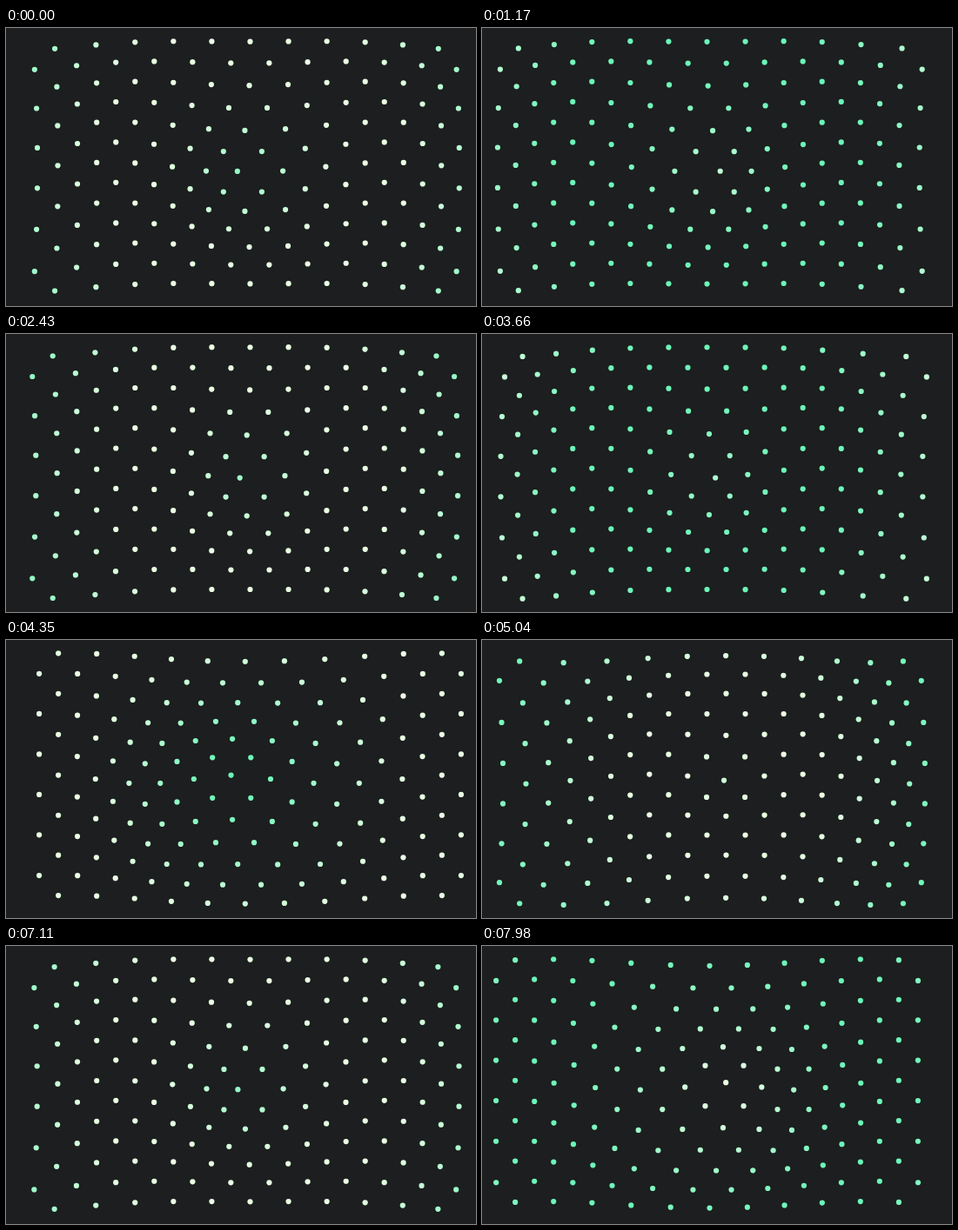
An HTML page with a canvas for the animation above (8000 ms loop, 540 by 320 pixels).

```html
<!DOCTYPE html>
<html lang="en">
<head>
<meta charset="utf-8">
<title>Swinging dots</title>
<style>
  html, body { margin: 0; width: 100%; height: 100%; overflow: hidden; background: #1c1e1f; }
  canvas { display: block; }
</style>
</head>
<body>
<canvas id="stage" width="540" height="320"></canvas>
<script>
const ctx = document.getElementById('stage').getContext('2d');
const LOOP = 8000, STEP = 30;
const ROWS = 13, GAP_X = 44.07, GAP_Y = 23.23;
const CENTER = { x: 269.5, y: 154.6 };
const SWING = 11, DOT = 3.1;
const SPEED = 0.002656;
const GREEN = [108, 245, 184], PALE = [234, 255, 227];

// Rows alternate between 11 and 12 dots, centred on the stage.
const dots = [];
for (let row = 0; row < ROWS; row++) {
  const count = row % 2 ? 12 : 11;
  for (let col = 0; col < count; col++) {
    const dx = (col - (count - 1) / 2) * GAP_X;
    const dy = (row - (ROWS - 1) / 2) * GAP_Y;
    dots.push({ x: CENTER.x + dx, y: CENTER.y + dy, dist: Math.hypot(dx, dy) });
  }
}

function mix(amount) {
  const rgb = GREEN.map((c, i) => Math.round(c + (PALE[i] - c) * amount));
  return `rgb(${rgb})`;
}

function draw(time) {
  ctx.fillStyle = '#1c1e1f';
  ctx.fillRect(0, 0, 540, 320);
  for (const { x, y, dist } of dots) {
    // Each dot is a pendulum whose phase grows with its distance from the centre.
    const phase = SPEED * time + 0.01117 * dist - 0.218;
    const angle = Math.PI / 2 * Math.sin(phase);
    const tint = Math.sin(phase + 0.0024 * dist - 0.14);
    ctx.fillStyle = mix(Math.min(1, Math.max(0, 0.5 + 0.55 * tint)));
    ctx.beginPath();
    ctx.arc(x + SWING * Math.sin(angle), y + SWING * Math.cos(angle), DOT, 0, Math.PI * 2);
    ctx.fill();
  }
}

const start = performance.now();
function tick() {
  const time = (performance.now() - start) % LOOP;
  draw(Math.floor(time / STEP) * STEP);
  requestAnimationFrame(tick);
}
tick();
</script>
</body>
</html>
```
